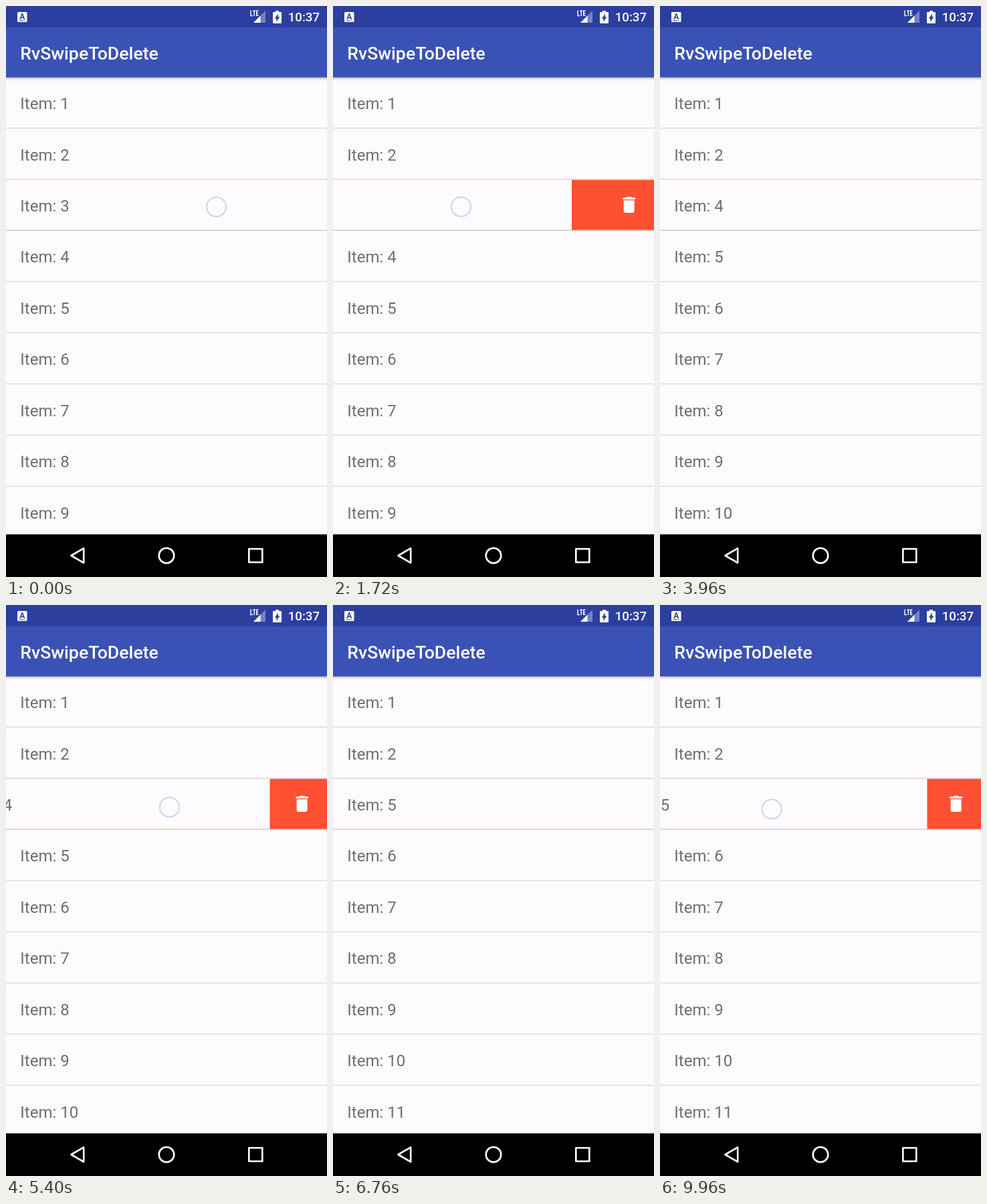
An HTML page for the animation above (10000 ms loop, 480 by 853 pixels).

```html
<!DOCTYPE html>
<html lang="en">
<head>
<meta charset="utf-8">
<title>Swipe to delete</title>
<style>
  html, body { margin: 0; width: 100%; height: 100%; overflow: hidden; background: #000; }
  svg { display: block; width: 480px; height: 853px; font-family: Roboto, sans-serif; }
  .row text { font-size: 24px; fill: #6f6e70; }
  .paper { fill: #fdfbfe; }
  .line { fill: #d7d6d9; }
  .nav { fill: none; stroke: #fff; stroke-width: 2.6; stroke-linejoin: round; }
</style>
</head>
<body>
<svg viewBox="0 0 480 853">
  <defs>
    <linearGradient id="shade" x2="0" y2="1">
      <stop offset="0" stop-color="#000" stop-opacity=".3"/>
      <stop offset=".4" stop-color="#000" stop-opacity=".1"/>
      <stop offset="1" stop-color="#000" stop-opacity="0"/>
    </linearGradient>
  </defs>

  <rect class="paper" width="480" height="853"/>
  <rect y="259.56" width="480" height="76.44" fill="#ff5033"/>
  <path id="bin" fill="#fff" transform="translate(426.67 281) scale(1.3333)"
    d="M6 19c0 1.1.9 2 2 2h8c1.1 0 2-.9 2-2V7H6v12zM19 4h-3.5l-1-1h-5l-1 1H5v2h14V4z"/>
  <g id="list"></g>
  <circle id="touch" r="14.6" fill="#fdfcff" fill-opacity=".6" stroke="#cdd3ec" stroke-width="2"/>

  <!-- app bar -->
  <rect y="106.5" width="480" height="5.5" fill="url(#shade)"/>
  <rect width="480" height="106.67" fill="#3a52b5"/>
  <text x="21.3" y="79.5" font-size="26.67" font-weight="500" fill="#fff">RvSwipeToDelete</text>

  <!-- status bar -->
  <rect width="480" height="32" fill="#2c3f9f"/>
  <rect x="17" y="9" width="14.5" height="15" rx="1.5" fill="#fff"/>
  <text x="24.2" y="19.6" font-size="12" font-weight="700" text-anchor="middle" fill="#2c3f9f">A</text>
  <path d="M20 21.8h6m1 0h1.5" stroke="#2c3f9f" stroke-width="1"/>
  <path d="M366 6.5v8h3M369.2 7.2h4M371.2 7v8M377.5 7.2h-2.8v7.1h2.8M374.7 10.7h2.4"
    fill="none" stroke="#fff" stroke-width="1.4"/>
  <path d="M388 7v18h-18z" fill="#fff" fill-opacity=".35"/>
  <path d="M380.5 14.5v10.500h-10.500z" fill="#fff"/>
  <path d="M403 7h5v2h2.800q1.200 0 1.200 1.200v14.600q0 1.200-1.200 1.200h-10.600q-1.200 0-1.200-1.200v-14.600q0-1.200 1.200-1.200h2.800z" fill="#fff"/>
  <path d="M406.800 11.500v4.800h2.600l-5 7.500v-5h-2.600z" fill="#2c3f9f"/>
  <text x="421.700" y="23" font-size="18.67" font-weight="500" fill="#fff">10:37</text>

  <!-- navigation bar -->
  <rect y="789.3" width="480" height="64" fill="#000"/>
  <path class="nav" d="M97.500 821l18.700-10.800v21.600z"/>
  <circle class="nav" cx="240" cy="821" r="11.300"/>
  <rect class="nav" x="363.300" y="811" width="20" height="20"/>
</svg>

<script>
const LOOP = 10000, STEP = 40, TOP = 106.67, PITCH = 76.44, SLOT = 2;

const linear = p => p;
const quad = p => p * p;
const out = p => Math.sin(p * Math.PI / 2);
const smooth = p => (1 - Math.cos(p * Math.PI)) / 2;

// Swipe offset of the third row: start, end, from, to, easing
const swipes = [
  [40, 1320, 0, -123, linear],
  [1720, 1880, -123, 0, smooth],
  [2480, 2920, 0, -84, out],
  [3170, 3440, -84, -240, quad],
  [3440, 3600, -240, -480, smooth],
  [3760, 3800, 0, 0, linear],
  [4880, 5440, 0, -86, out],
  [5760, 6200, -86, -240, quad],
  [6200, 6360, -240, -480, smooth],
  [6520, 6560, 0, 0, linear],
  [7600, 8440, 0, -65, out],
  [8880, 9040, -65, 0, smooth],
  [9440, 9680, 0, -66, out],
  [9840, 9960, -66, -80.5, linear]
];

// Finger on screen: start, end, x at rest, y
const touches = [
  [0, 1760, 314.5, 300],
  [2480, 3440, 334, 300],
  [4880, 6200, 330, 302],
  [7600, 8880, 266.5, 306.5],
  [9480, LOOP, 247.5, 305]
];

// Row removed, gap closed
const removals = [[3760, 3960], [6520, 6760]];
const CLOSE = 150;

const $ = id => document.getElementById(id);
const progress = (t, a, b) => Math.min(1, Math.max(0, (t - a) / (b - a)));
const move = (el, x, y) => el.setAttribute("transform", `translate(${x} ${y})`);

$("list").innerHTML = `<g class="row">
  <g><rect class="paper" width="480" height="75.2"/><text x="21.3" y="47.4"></text></g>
  <rect class="line" y="75.1" width="480" height="1.34"/>
</g>`.repeat(10);
const rows = [...document.querySelectorAll(".row")];

function swipeAt(t) {
  const swipe = swipes.findLast(s => t >= s[0]);
  if (!swipe) return 0;
  const [start, end, from, to, ease] = swipe;
  return from + (to - from) * ease(progress(t, start, end));
}

function draw(t) {
  const x = swipeAt(t);
  const gone = removals.filter(r => t >= r[0]);
  const last = gone.at(-1);
  const gap = last ? PITCH * (1 - smooth(progress(t, last[1] - CLOSE, last[1]))) : 0;

  rows.forEach((row, i) => {
    const below = i >= SLOT;
    move(row, 0, TOP + i * PITCH + (below ? gap : 0));
    move(row.firstElementChild, i === SLOT ? x : 0, 0);
    row.querySelector("text").textContent = "Item: " + (i + 1 + (below ? gone.length : 0));
  });
  $("bin").style.display = gap > 0 ? "none" : "";

  const touch = touches.find(([start, end]) => t >= start && t < end);
  $("touch").style.display = touch ? "" : "none";
  if (touch) move($("touch"), touch[2] + x, touch[3]);
}

const begin = performance.now();
function tick() {
  const t = (performance.now() - begin) % LOOP;
  draw(Math.floor(t / STEP) * STEP);
  requestAnimationFrame(tick);
}
tick();
</script>
</body>
</html>
```
